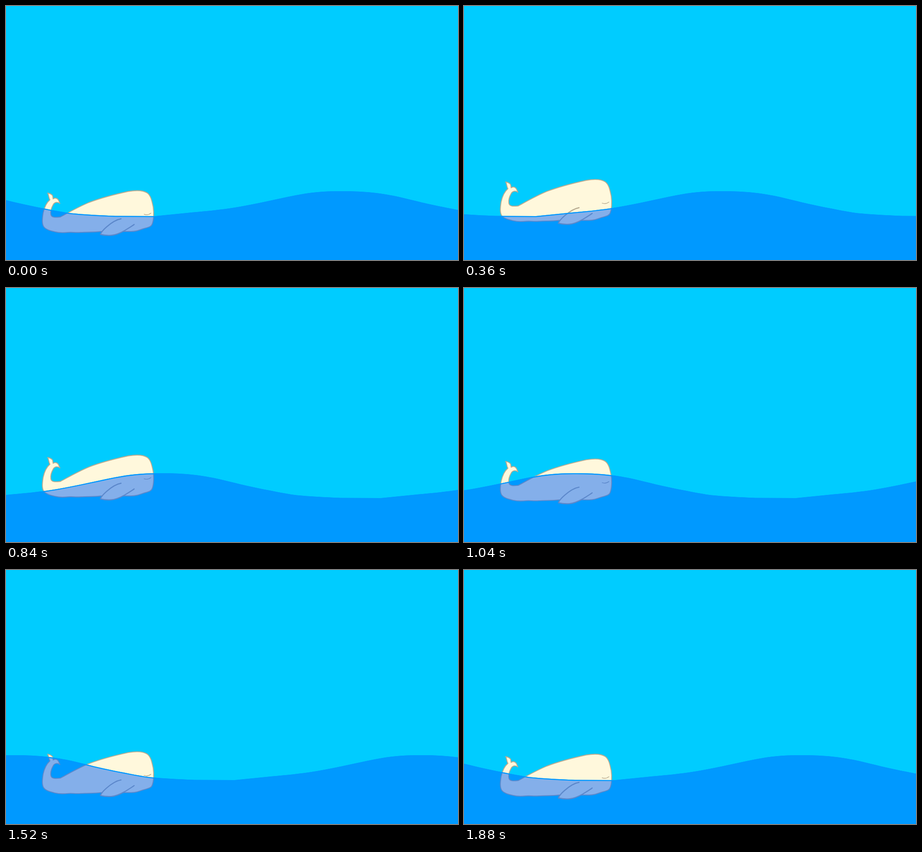
An HTML page with a canvas that plays this animation: 998 px wide and 561 px high, repeating every 1.92 s.

```html
<!DOCTYPE html>
<html lang="en">
<head>
<meta charset="utf-8">
<title>Whale on the waves</title>
<style>
html, body { margin: 0; width: 998px; height: 561px; overflow: hidden; background: #0cf; }
canvas { display: block; }
</style>
</head>
<body>
<canvas id="stage" width="998" height="561"></canvas>
<script>
const ctx = document.getElementById('stage').getContext('2d');
const LOOP = 1920, STEP = 40, WAVELENGTH = 897, SPEED = 19, APEX = 23, LAST = 47;

const swell = new Path2D(`M330 464 L400 457 C432 454 465 451 493 447 C540 440 590 428 640 418
  C670 412 700 409 735 409 C790 408.5 825 413 860 420 C890 426.5 920 435 955 442
  C1000 451 1020 455 1040 457.5 C1070 460.5 1100 462 1137 463.5 L1227 464`);

// Surface line and water body, long enough for the whole scroll
const surface = new Path2D(), water = new Path2D();
for (let i = -1; i < 2; i++) {
  const move = new DOMMatrix().translate(i * WAVELENGTH, 0);
  const block = new Path2D(swell);
  block.lineTo(1227.5, 600);
  block.lineTo(329.5, 600);
  block.closePath();
  surface.addPath(swell, move);
  water.addPath(block, move);
}

const body = new Path2D(`M92 413 C97 414 101 416 103 419 L104 426 C108 423 113 424 116 429
  L119 436 C114 432 107 433 104 439 C100 446 98 453 99 460 C100 468 110 467 120 466
  C135 458 157 445 183 434 C212 423 240 416 270 409.5 C288 406.5 303 407 312 413
  C320 419 322 430 325 444 C327 458 326 473 323 481 C321 488 313 489 303 492
  C292 496 286 498 276 498 L262 498 L210 498 C194 500 180 499 165 500
  C152 501 146 499 137 500 C127 501 117 501 109 499 C97 496 88 494 83 487
  C79 480 80 470 82 457 C85 443 90 434 97 428 C94 424 95 418 92 413 Z`);
const flipper = new Path2D(`M254 470 C242 472 230 481 222 488 C214 495 210 500 208.5 504.5
  C215 506 224 507 232 506.5 C242 506 253 501 262 496 C270 491 277 487 283 482.5`);
const smile = new Path2D('M305 460 Q313 463 320 457.5');

function drawWhale(y, fill, line) {
  ctx.save();
  ctx.translate(0, y);
  ctx.fillStyle = fill;
  ctx.strokeStyle = line;
  ctx.lineCap = ctx.lineJoin = 'round';
  for (const [path, width] of [[body, 1.9], [flipper, 2.4]]) {
    ctx.fill(path);
    ctx.lineWidth = width;
    ctx.stroke(path);
  }
  ctx.lineWidth = 1.4;
  ctx.stroke(smile);
  ctx.restore();
}

const easeOut = u => 1 - (1 - u) ** 2;
const bob = n => n < APEX
  ? -39 * easeOut(n / APEX)
  : -39 + 38 * easeOut((n - APEX) / (LAST - APEX));

function draw(now) {
  const n = Math.floor(now % LOOP / STEP), y = bob(n), x = -SPEED * n;
  ctx.fillStyle = '#0cf';
  ctx.fillRect(0, 0, 998, 561);
  drawWhale(y, '#fff8dc', '#b9ac92');

  ctx.save();
  ctx.translate(x, 0);
  ctx.fillStyle = '#09f';
  ctx.fill(water);
  ctx.clip(water);
  ctx.translate(-x, 0);
  drawWhale(y, '#84afea', '#5c88cb');
  ctx.translate(x, 1);
  ctx.strokeStyle = '#09f';
  ctx.lineWidth = 2.6;
  ctx.stroke(surface);
  ctx.restore();

  requestAnimationFrame(() => draw(performance.now()));
}
draw(0);
</script>
</body>
</html>
```
